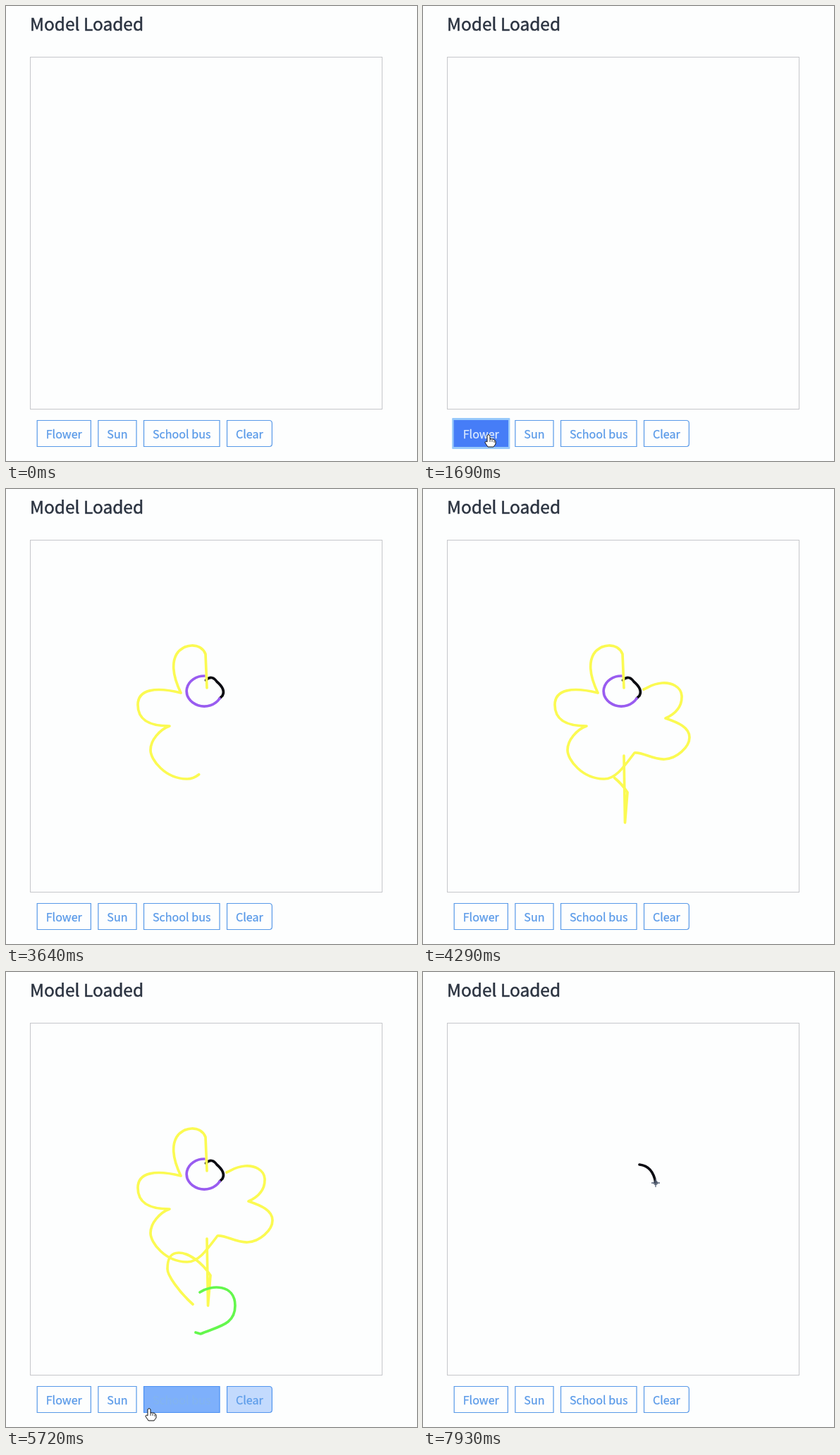
Write an HTML page that moves like this. It is 583 px wide and 645 px high and loops after 8000 ms.

```html
<!DOCTYPE html>
<html lang="en">
<head>
<meta charset="utf-8">
<title>Drawing model</title>
<style>
  html, body { margin: 0; width: 100%; height: 100%; overflow: hidden; background: #fdfefe; }
  svg { display: block; width: 583px; height: 645px; }
  text { font-family: "Noto Sans CJK SC", "Noto Sans CJK JP", "Noto Sans CJK", "Open Sans", sans-serif; }
  #title { font-size: 24.5px; fill: #2b3340; stroke: #2b3340; stroke-width: .5px; }
  #buttons text { font-size: 16.1px; text-anchor: middle; stroke-width: .25px; }
  #buttons path { stroke-width: 1.2; }
  #ink path { fill: none; stroke-width: 3.7; stroke-linecap: round; stroke-linejoin: round; }
</style>
</head>
<body>
<svg viewBox="0 0 583 645">
  <text id="title" x="34" y="35"></text>
  <rect x="34.5" y="72.5" width="499" height="499" fill="none" stroke="#c6c7cb"/>
  <g id="buttons"></g>
  <g id="ink"></g>
  <g id="hand" stroke="#111" stroke-linejoin="round">
    <path fill="#fff" d="M-2 1Q0-2 2 1V6Q8 5 10 9V13L7 17H-1L-5 11Q-5 8-2 10Z"/>
    <path fill="none" stroke-width=".8" d="M2 6V10M5 7V10M8 8V11"/>
  </g>
  <g id="cross" fill="none" stroke="#566378">
    <path stroke-width="1.3" d="M-6 0H6M0-6V6"/>
    <circle r="2.8"/>
  </g>
</svg>
<script>
const LOOP = 8000, STEP = 130;
const PAPER = [253, 254, 254], BLUE = [88, 153, 232], HOVER = [68, 140, 250], PRESSED = [70, 125, 247], PALE = [222, 236, 255];

const $ = id => document.getElementById(id);
const clamp = p => Math.max(0, Math.min(1, p));
const ease = p => p * p * (3 - 2 * p);
const during = (t, [from, to]) => t >= from && t < to;
const show = (el, on) => { el.style.display = on ? '' : 'none'; };
const mix = (a, b, p) => `rgb(${a.map((v, i) => Math.round(v + (b[i] - v) * p))})`;

function add(parent, tag, attrs) {
  const el = document.createElementNS('http://www.w3.org/2000/svg', tag);
  for (const key in attrs) el.setAttribute(key, attrs[key]);
  return parent.appendChild(el);
}

// Buttons are sized by their labels and set in a row.
const buttons = [
  { label: 'Flower', hover: [390, 2080], focus: [650, 2210] },
  { label: 'Sun', hover: [5720, 7410], focus: [6110, 7540] },
  { label: 'School bus', hover: [5590, 5720] },
  { label: 'Clear', hover: [5330, 5590], round: 4 }
];
let left = 44.2;
for (const b of buttons) {
  const group = $('buttons'), r = b.round || 0;
  b.ring = add(group, 'rect', { y: 584, height: 44, rx: 1, fill: '#97c9fb' });
  b.box = add(group, 'path', {});
  b.text = add(group, 'text', { y: 613 });
  b.text.textContent = b.label;
  const w = b.text.getComputedTextLength() + 25;
  b.ring.setAttribute('x', left - 3);
  b.ring.setAttribute('width', w + 6);
  b.box.setAttribute('d', `M${left} 587.5h${w - r}q${r} 0 ${r} ${r}v${37 - 2 * r}q0 ${r} ${-r} ${r}h${r - w}z`);
  b.text.setAttribute('x', left + w / 2);
  left += w + 10.5;
}

// The user's strokes have set times; the model's follow one another at one speed.
const CLEARED = 6110, USER_TIME = 390, SPEED = .7;
const strokes = [
  { color: '#0c0c12', start: 2210, d: 'M283.5 271Q292 263 299 273Q312 284 307 293L303 297' },
  { color: '#995cf0', d: 'M303 297A25 21.5 0 1 1 282 265' },
  { color: '#fbfa52', d: `M285 282L283 234C276 216 250 220 242 234S238 268 248 289
      C212 280 187 284 187 306S204 336 232 336
      C218 341 205 356 205 370S226 411 257 411C272 411 282 398 300 374
      C313 373 326 384 343 383S378 366 378 352S362 331 344 325
      Q368 314 367 293C366 280 352 274 339 275S322 280 313 284` },
  { color: '#fbfa52', d: 'M285 378L286.500 473L290 430C278 412 260 398 245 398S229 412 229 421S245 453 265 471' },
  { color: '#64f74d', d: 'M275 454C291 443 325 442 325 473C325 500 302 502 276 513L269 511' },
  { color: '#0c0c12', start: 7540, d: 'M307 273Q326 275 330 299' }
];
let next = 2890;
for (const s of strokes) {
  s.el = add($('ink'), 'path', { d: s.d, stroke: s.color });
  s.length = s.el.getTotalLength();
  s.user = 'start' in s;
  s.time = s.user ? USER_TIME : s.length / SPEED;
  if (!s.user) {
    s.start = next;
    next += s.time;
  }
  s.end = s.start < CLEARED ? CLEARED : LOOP;
}

// Pointer moves: start, end, then where it comes to rest.
const visits = [[130, 2860], [5330, LOOP]];
const moves = [
  [0, 0, 112, 640], [130, 520, 93, 608], [1690, 2210, 283, 271],
  [5200, 5200, 345, 636], [5330, 5590, 310, 619], [5590, 5720, 203, 619],
  [5720, 5980, 160, 609], [6370, 6760, 209, 518], [6760, 7410, 307, 273]
];

function pointer(t) {
  let x = 0, y = 0;
  for (const [from, to, toX, toY] of moves) {
    if (t < from) break;
    const p = to > from ? ease(clamp((t - from) / (to - from))) : 1;
    x += (toX - x) * p;
    y += (toY - y) * p;
  }
  return { x, y };
}

function draw(t) {
  const loading = during(t, [780, 1300]) || during(t, [CLEARED, 6500]);
  $('title').textContent = loading ? 'Loading Model...' : 'Model Loaded';

  for (const b of buttons) {
    const [enter, leave] = b.hover;
    const heat = clamp((t - enter) / 190) - clamp((t - leave) / 190);
    const focused = during(t, b.focus || [0, 0]);
    const tone = focused ? PRESSED : HOVER;
    const ink = mix(BLUE, PALE, heat ** 3);
    show(b.ring, focused);
    b.box.setAttribute('fill', mix(PAPER, tone, heat));
    b.box.setAttribute('stroke', mix(BLUE, tone, heat));
    b.text.setAttribute('fill', ink);
    b.text.setAttribute('stroke', ink);
  }

  let { x, y } = pointer(t);
  for (const s of strokes) {
    const shown = during(t, [s.start, s.end]);
    show(s.el, shown);
    if (!shown) continue;
    const drawn = clamp((t - s.start) / s.time) * s.length;
    s.el.setAttribute('stroke-dasharray', `${drawn} 9999`);
    if (s.user && t < s.start + 650) ({ x, y } = s.el.getPointAtLength(drawn));
  }

  const present = visits.some(v => during(t, v)), overButtons = y > 572;
  show($('hand'), present && overButtons);
  show($('cross'), present && !overButtons);
  $(overButtons ? 'hand' : 'cross').setAttribute('transform', `translate(${x} ${y})`);
}

const begin = performance.now();
function tick() {
  const t = (performance.now() - begin) % LOOP;
  draw(Math.floor(t / STEP + 1e-3) * STEP);
  requestAnimationFrame(tick);
}
tick();
</script>
</body>
</html>
```
